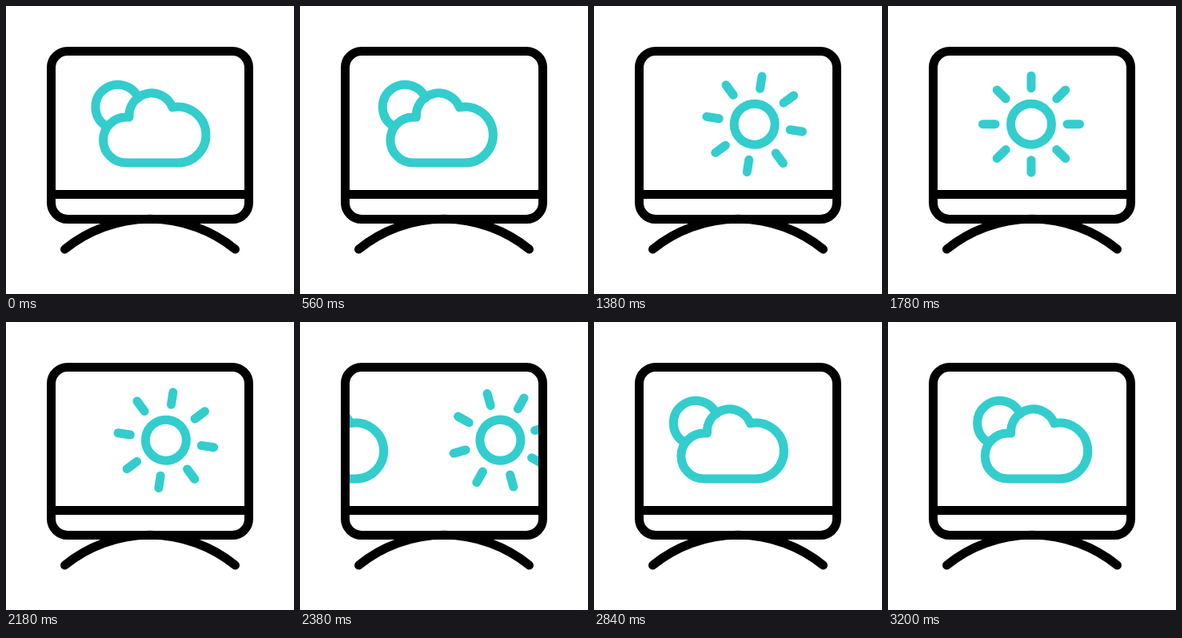
An HTML page for the animation above (3.22 s loop, 360 px wide and 360 px high).

```html
<!DOCTYPE html>
<html lang="en">
<head>
<meta charset="utf-8">
<title>Weather screen</title>
<style>
  html, body { margin: 0; width: 100%; height: 100%; overflow: hidden; background: #fff; }
  svg { display: block; width: 100vw; height: 100vh; }
  .line { fill: none; stroke-width: 11; stroke-linecap: round; stroke-linejoin: round; }
  .weather { stroke: #33cdcd; }
  .tv { stroke: #000; }
</style>
</head>
<body>
<svg viewBox="0 0 360 360">
  <clipPath id="screen"><rect x="57" y="57" width="246" height="178"/></clipPath>
  <g class="line weather" clip-path="url(#screen)">
    <g id="cloud">
      <path d="M123.5 149 A28 28 0 1 1 165.5 115"/>
      <path d="M150 196 A28.5 28.5 0 0 1 150 139 L154 139 A28 28 0 0 1 208 126.7 A35 35 0 1 1 215 196 Z"/>
    </g>
    <g id="sun"><circle r="25.5"/></g>
  </g>
  <g class="line tv">
    <rect x="56.5" y="56.5" width="247" height="210" rx="20.5"/>
    <path d="M57 235.5 H303"/>
    <path d="M73.5 304 A169 169 0 0 1 286.5 304"/>
  </g>
</svg>
<script>
  const LOOP = 3220;
  const CLOUD_TRAVEL = 217;
  const SUN = { x: 179, y: 147.7, travel: 336, degPerPx: 0.41 };

  const cloud = document.getElementById('cloud');
  const sun = document.getElementById('sun');

  for (let angle = 0; angle < 360; angle += 45) {
    const ray = document.createElementNS('http://www.w3.org/2000/svg', 'path');
    ray.setAttribute('d', 'M45 0 H60.5');
    ray.setAttribute('transform', `rotate(${angle})`);
    sun.append(ray);
  }

  const span = (t, from, to) => Math.min(1, Math.max(0, (t - from) / (to - from)));
  const cubic = u => u < 0.5 ? 4 * u ** 3 : 1 - 4 * (1 - u) ** 3;

  // Cubic bezier easing with control points (x1, 0) and (x2, 1)
  function bezier(u, x1, x2) {
    let lo = 0, hi = 1;
    for (let i = 0; i < 24; i++) {
      const s = (lo + hi) / 2, r = 1 - s;
      const x = 3 * r * r * s * x1 + 3 * r * s * s * x2 + s ** 3;
      if (x < u) lo = s; else hi = s;
    }
    return lo * lo * (3 - 2 * lo);
  }

  function cloudOut(t) {
    return t < 1765
      ? cubic(span(t, 215, 1826))
      : 1 - bezier(span(t, 1765, 3270), 0.7, 0.17);
  }

  function sunOut(t) {
    return t < 1785
      ? 1 - cubic(span(t, 200, 1780))
      : cubic(span(t, 1787, 3367));
  }

  function draw(t) {
    cloud.setAttribute('transform', `translate(${-CLOUD_TRAVEL * cloudOut(t)} 0)`);
    const dx = SUN.travel * sunOut(t);
    sun.setAttribute('transform',
      `translate(${SUN.x + dx} ${SUN.y}) rotate(${dx * SUN.degPerPx})`);
  }

  const start = performance.now();
  function tick() {
    draw((performance.now() - start) % LOOP);
    requestAnimationFrame(tick);
  }
  tick();
</script>
</body>
</html>
```
